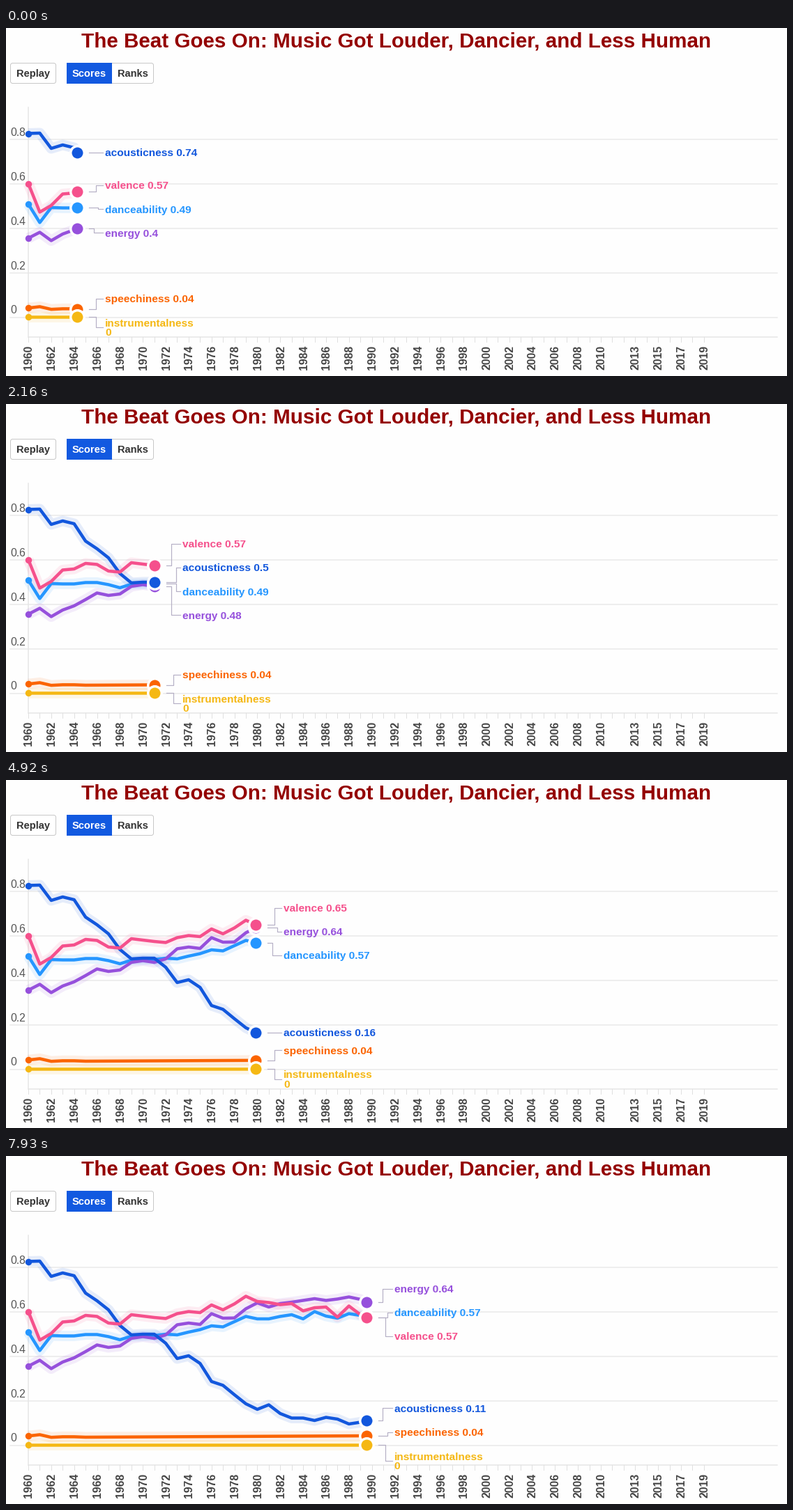
Write a matplotlib script that moves like this. It is 1120 px wide and 500 px high and loops after 8 s.

```python
import matplotlib.pyplot as plt
import numpy as np
from itertools import groupby
from matplotlib.animation import FuncAnimation
from matplotlib.patches import FancyBboxPatch, Rectangle

W, H, DPI = 1120, 500, 100
PX = 72 / DPI                      # points per pixel
LOOP, STEP = 8000, 64              # ms
FRAMES = LOOP // STEP

X0, DX = 32, 16.42                 # first year, width of a year
Y0, UNIT = 415.5, 319.4            # zero line, height of 1.0
START, SPEED = 4.26, 0.003209      # years shown at once, years per ms
GAP, TALL_GAP = 34.2, 41.6         # label spacing, wider before two lines

plt.rcParams["font.family"] = "Liberation Sans"

# Height on the stage for each year from 1960, listed back to front
SERIES = [
    ("danceability", "#2596ff", [
        253, 279.5, 258, 258.5, 258.5, 256.5, 256.5, 259.5, 264, 259,
        258.5, 258, 256, 257, 253, 249.5, 244, 245.5, 238, 230.5,
        234, 234, 230.5, 228, 234, 223.5, 230, 233, 226.5, 229, 235.1]),
    ("energy", "#9650dc", [
        302, 293.5, 305.5, 296, 290, 281, 271.5, 275, 273, 262,
        259.5, 262, 257, 242.5, 240, 242, 226.5, 233, 232.7, 219.5,
        211, 217, 212, 210, 207.5, 205, 207.5, 205.5, 202.5, 206, 213.6]),
    ("speechiness", "#fb6400", np.concatenate([
        [402.3, 400.4, 404.2, 403.4, 403.4], np.linspace(404, 402, 26)])),
    ("acousticness", "#1257dd", [
        151.5, 151, 173, 168, 172, 197, 208, 221, 243.5, 257,
        256, 256, 269, 291, 287, 298, 324, 329.5, 343, 356,
        364, 357.5, 370, 376.5, 376.5, 380, 375.5, 378, 385, 382.5, 377.1]),
    ("instrumentalness", "#f5b814", np.full(31, 415.2)),
    ("valence", "#f5508c", [
        223.5, 264.5, 255, 238.5, 237, 229, 230.5, 240, 241.5, 228,
        230, 232, 233.5, 226.5, 223.5, 225, 214, 221, 212.5, 201.5,
        209, 210.5, 213.6, 212, 222.5, 218, 217, 231.5, 215.5, 228, 236.3]),
]

fig = plt.figure(figsize=(W / DPI, H / DPI), dpi=DPI, facecolor="#fefefe")
ax = fig.add_axes([0, 0, 1, 1])
ax.set(xlim=(0, W), ylim=(H, 0))
ax.axis("off")


def write(x, y, text, size, color, weight="bold", **kw):
    return ax.text(x, y, text, fontsize=size * PX, color=color,
                   weight=weight, va="baseline", **kw)


def stroke(xs, ys, color, width, **kw):
    return ax.plot(xs, ys, color=color, lw=width * PX, **kw)[0]


def button(x, y, w, h, text, face, edge, ink):
    ax.add_patch(FancyBboxPatch(
        (x, y), w, h, boxstyle="round,pad=0,rounding_size=3",
        fc=face, ec=edge, lw=PX))
    write(x + w / 2, 70, text, 14.6, ink, ha="center")


def draw_static():
    write(560, 27.5, "The Beat Goes On: Music Got Louder, Dancier, "
          "and Less Human", 29.6, "#940000", ha="center")
    button(6.5, 50.5, 65, 29, "Replay", "white", "#c8c8c8", "#333333")
    button(87.5, 50.5, 124, 29, "", "white", "#c8c8c8", "#333333")
    ax.add_patch(Rectangle((87, 50), 65, 30, fc="#1259e0", lw=0))
    write(119.5, 70, "Scores", 14.6, "white", ha="center")
    write(182, 70, "Ranks", 14.6, "#333333", ha="center")

    for k in range(5):
        y = Y0 - 0.2 * k * UNIT
        stroke([6, 1106], [y, y], "#e9e9e9", 1.5, zorder=1)
        text = f"{0.2 * k:.1f}" if k else "0"
        write(6, y - 5, text, 15.8, "#555555", "normal", zorder=1)
    stroke([X0, X0], [114, 444], "#e6e6e6", 1.5, zorder=1)
    stroke([X0, 1106], [444, 444], "#e6e6e6", 1.5, zorder=1)
    for k in range(60):
        x = X0 + k * DX
        stroke([x, x], [444, 451], "#e0e0e0", 1, zorder=1)
        year = 1960 + k
        if (year <= 2010 and k % 2 == 0) or (year > 2012 and k % 2):
            write(x + 5.5, 456, str(year), 15.7, "#444444", ha="right",
                  rotation=90, rotation_mode="anchor")


class Track:
    """One series: growing line, moving dot, leader and label."""

    def __init__(self, name, color, ys, level):
        self.name, self.ys = name, np.asarray(ys, float)
        self.tall = name == "instrumentalness"
        joins = dict(solid_joinstyle="round", solid_capstyle="butt")
        self.halo = stroke([], [], color, 15, alpha=0.1, zorder=2, **joins)
        self.line = stroke([], [], color, 4.5, zorder=3 + level / 10, **joins)
        ax.plot(X0, self.ys[0], "o", color=color, ms=9.5 * PX, mew=0,
                zorder=3 + level / 10)
        self.dot = ax.plot([], [], "o", mfc=color, mec="white",
                           ms=19.5 * PX, mew=3.5 * PX,
                           zorder=4 + level / 10)[0]
        self.leader = stroke([], [], "#b6b0c6", 1.2, zorder=5)
        self.words = [write(0, 0, "", 15.4, color, zorder=6)
                      for _ in range(2 if self.tall else 1)]

    def move(self, pos):
        n = int(pos) + 1
        self.x = X0 + pos * DX
        self.y = np.interp(pos, np.arange(len(self.ys)), self.ys)
        xs = np.append(X0 + DX * np.arange(n), self.x)
        ys = np.append(self.ys[:n], self.y)
        self.halo.set_data(xs, ys)
        self.line.set_data(xs, ys)
        self.dot.set_data([self.x], [self.y])

    def place_label(self, elbow):
        value = f"{abs(round((Y0 - self.y) / UNIT, 2)):g}"
        if self.tall:
            parts = [(self.name, -1.5), (value, 12)]
        else:
            parts = [(f"{self.name} {value}", 5.4)]
        for word, (text, dy) in zip(self.words, parts):
            word.set_text(text)
            word.set_position((self.x + 40, self.label_y + dy))
        self.leader.set_data(
            self.x + np.array([17, elbow, elbow, 37]),
            [self.y, self.y, self.label_y, self.label_y])

    def side(self):
        shift = self.label_y - self.y
        return 0 if abs(shift) < 0.7 else np.sign(shift)


def spacing(track):
    return TALL_GAP if track.tall else GAP


def spread_labels(order):
    """Space out each run of crowded labels around its mean height."""
    runs = [[order[0]]]
    for a, b in zip(order, order[1:]):
        if b.y - a.y < spacing(b):
            runs[-1].append(b)
        else:
            runs.append([b])
    for run in runs:
        offsets = np.cumsum([0] + [spacing(t) for t in run[1:]])
        top = np.mean([t.y for t in run] - offsets)
        for t, off in zip(run, offsets):
            t.label_y = top + off


draw_static()
tracks = [Track(*s, level) for level, s in enumerate(SERIES)]


def update(frame):
    pos = START + SPEED * frame * STEP
    for t in tracks:
        t.move(pos)
    order = sorted(tracks, key=lambda t: t.y)
    spread_labels(order)
    # Leaders bending the same way take staggered elbows
    for side, group in groupby(order, key=Track.side):
        group = list(group)
        for k, t in enumerate(group):
            rank = k if side <= 0 else len(group) - 1 - k
            t.place_label(17 + 20 * (rank + 1) / (len(group) + 1))
    return []


anim = FuncAnimation(fig, update, frames=FRAMES, interval=STEP,
                     init_func=lambda: update(0), repeat=True,
                     repeat_delay=0, blit=False)
plt.show()
```
